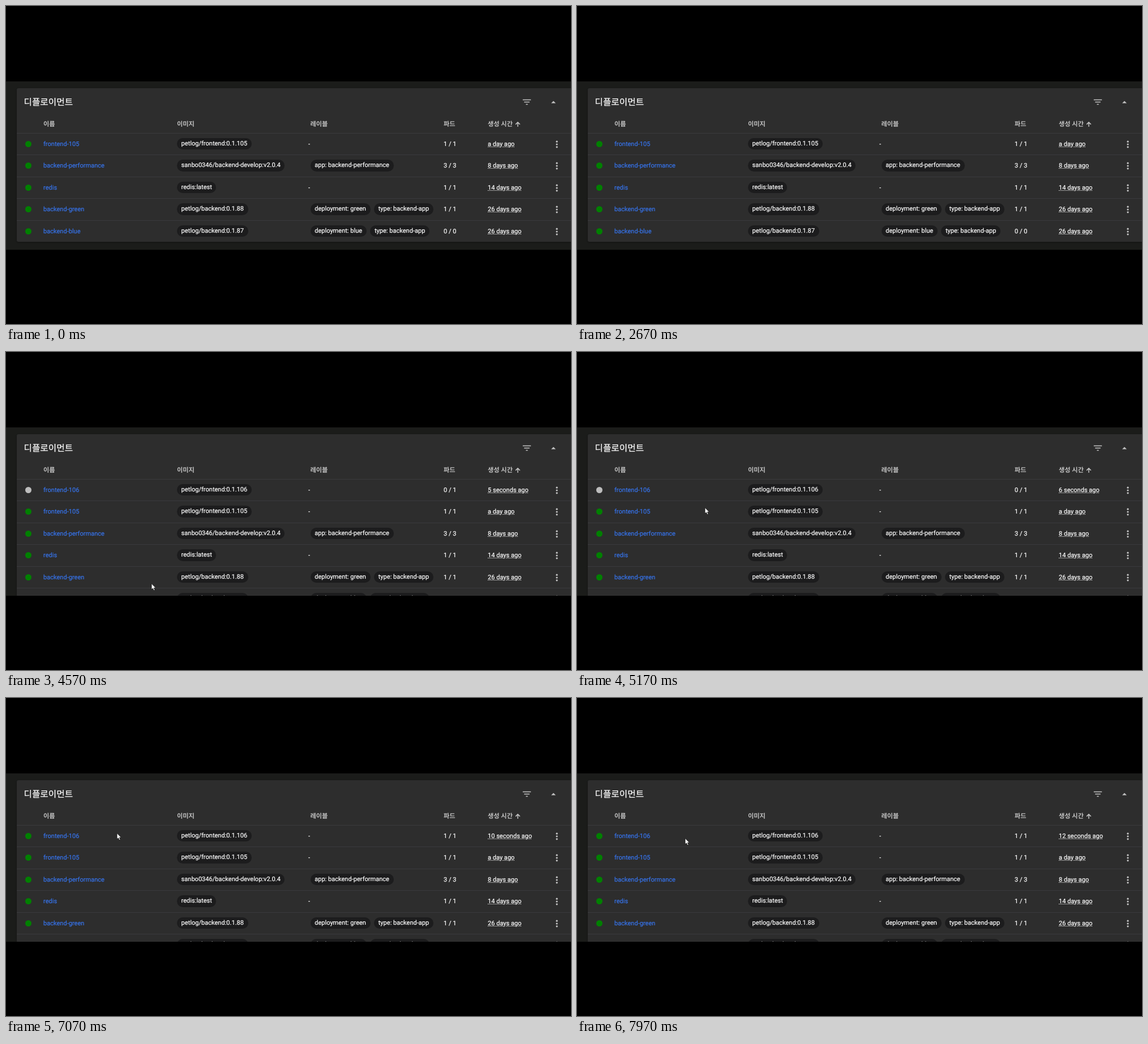
An HTML page for the animation above (8 s loop, 998 px wide and 561 px high).

```html
<!DOCTYPE html>
<html lang="ko">
<head>
<meta charset="utf-8">
<title>디플로이먼트</title>
<style>
  html, body { margin: 0; width: 100%; height: 100%; overflow: hidden; background: #000; }
  body {
    position: relative;
    font: 11.05px Roboto, "Noto Sans CJK KR", "Noto Sans CJK JP", "Noto Sans CJK", sans-serif;
    color: #fff;
    text-rendering: geometricPrecision;
    -webkit-text-stroke: .2px currentColor;
  }
  #band { position: absolute; left: 0; top: 132.5px; width: 998px; height: 297px; overflow: hidden; background: #1b1c1a; }
  #card {
    position: absolute; left: 19px; top: 12.5px; width: 1000px; padding-top: 79px;
    background: #2d2d2d; border-radius: 3px; box-shadow: 0 1px 3px #0005;
  }
  #card > .text, .row > * { position: absolute; white-space: pre; }
  .title { font-size: 15.7px; line-height: 24px; }
  .head { font-size: 11.2px; font-weight: 700; line-height: 20px; color: #c0c0c0; -webkit-text-stroke: 0; }
  .row { position: relative; box-sizing: border-box; height: 38.4px; border-top: 1px solid #3a3a3d; line-height: 37.4px; }
  .dot { top: 13px; width: 11px; height: 11px; border-radius: 50%; background: #008000; }
  .link { color: #3774ec; }
  .chips { top: 8px; display: flex; gap: 6.6px; }
  .chip { height: 20.4px; line-height: 20px; padding: 0 7.6px; border-radius: 11px; background: #1c1c1d; }
  .age { line-height: 38px; text-decoration: underline dotted 1px; }
  svg { position: absolute; left: 0; top: 0; overflow: visible; }
  .row svg { left: 954.2px; top: 19px; fill: #c8c8c8; }
</style>
</head>
<body>
<div id="band">
  <div id="card"></div>
  <svg width="998" height="297" viewBox="0 132.5 998 297">
    <g fill="#c4c4c4">
      <path transform="translate(910.4 159.4) scale(.8)" d="M10 18h4v-2h-4zM3 6v2h18V6zM6 13h12v-2H6z"/>
      <path transform="translate(957.4 159.8) scale(.8)" d="M7 14l5-5 5 5z"/>
    </g>
    <path d="M904 212.5V204.5M900.2 208.4L904 204.6L907.8 208.4" fill="none" stroke="#c4c4c4" stroke-width="1.5"/>
    <path id="cursor" d="M0 0V10.6L2.4 8.4L4.1 12.2L6 11.4L4.3 7.7H7.6Z" fill="#fff" stroke="#111" stroke-width=".8"/>
  </svg>
</div>
<script>
const LOOP = 8000, CREATED = 1770, INSERTED = 2950, READY = 5450, SECOND = 500;
const CARD_X = 19;
const card = document.getElementById('card');
const cursor = document.getElementById('cursor');

// time, x, y of the pointer tip
const pointerPath = [
  [4500, 262, 432], [4850, 238, 315], [5170, 226, 274], [5650, 222, 270],
  [6150, 186, 242], [6370, 184, 240], [6750, 190, 239], [7070, 196, 238],
  [7500, 195, 241], [7970, 191, 247]
];

function add(parent, className, x, text = '') {
  const el = document.createElement('div');
  el.className = className;
  el.style.left = x - CARD_X + 'px';
  el.textContent = text;
  parent.append(el);
  return el;
}

function addChips(row, x, labels) {
  const group = add(row, 'chips', x);
  for (const label of labels) {
    const chip = document.createElement('span');
    chip.className = 'chip';
    chip.textContent = label;
    group.append(chip);
  }
}

function addRow(name, image, labels, pods, age) {
  const row = document.createElement('div');
  row.className = 'row';
  card.append(row);
  const dot = add(row, 'dot', 34);
  add(row, 'link', 66, name);
  addChips(row, 302, [image]);
  if (labels.length) addChips(row, 537.6, labels);
  else add(row, '', 534.1, '-');
  const podCell = add(row, '', 773, pods);
  const ageCell = add(row, 'age', 851, age);
  row.insertAdjacentHTML('beforeend', '<svg width="1" height="1">' +
    [-4.8, 0, 4.8].map(y => `<circle cy="${y}" r="1.6"/>`).join('') + '</svg>');
  return { row, dot, podCell, ageCell };
}

add(card, 'text title', 31.5, '디플로이먼트').style.top = '12.6px';
[[66, '이름'], [302, '이미지'], [537.5, '레이블'], [773, '파드'], [851, '생성 시간']]
  .forEach(([x, label]) => add(card, 'text head', x, label).style.top = '54.4px');

const fresh = addRow('frontend-106', 'petlog/frontend:0.1.106', [], '0 / 1', '');
addRow('frontend-105', 'petlog/frontend:0.1.105', [], '1 / 1', 'a day ago');
addRow('backend-performance', 'sanbo0346/backend-develop:v2.0.4', ['app: backend-performance'], '3 / 3', '8 days ago');
addRow('redis', 'redis:latest', [], '1 / 1', '14 days ago');
addRow('backend-green', 'petlog/backend:0.1.88', ['deployment: green', 'type: backend-app'], '1 / 1', '26 days ago');
addRow('backend-blue', 'petlog/backend:0.1.87', ['deployment: blue', 'type: backend-app'], '0 / 0', '26 days ago');

function pointerAt(t) {
  const next = pointerPath.findIndex(p => p[0] > t);
  if (next < 0) return pointerPath[pointerPath.length - 1].slice(1);
  if (next === 0) return null;
  const [t0, x0, y0] = pointerPath[next - 1], [t1, x1, y1] = pointerPath[next];
  const k = (t - t0) / (t1 - t0);
  return [x0 + (x1 - x0) * k, y0 + (y1 - y0) * k].map(Math.round);
}

function draw(t) {
  const ready = t >= READY;
  fresh.row.style.display = t >= INSERTED ? '' : 'none';
  fresh.dot.style.background = ready ? '#008000' : '#bdbdbd';
  fresh.podCell.textContent = ready ? '1 / 1' : '0 / 1';
  fresh.ageCell.textContent = Math.max(0, Math.floor((t - CREATED) / SECOND)) + ' seconds ago';
  const tip = pointerAt(t);
  cursor.style.display = tip ? '' : 'none';
  if (tip) cursor.setAttribute('transform', `translate(${tip})`);
}

const start = performance.now();
function tick() {
  draw((performance.now() - start) % LOOP);
  requestAnimationFrame(tick);
}
tick();
</script>
</body>
</html>
```
